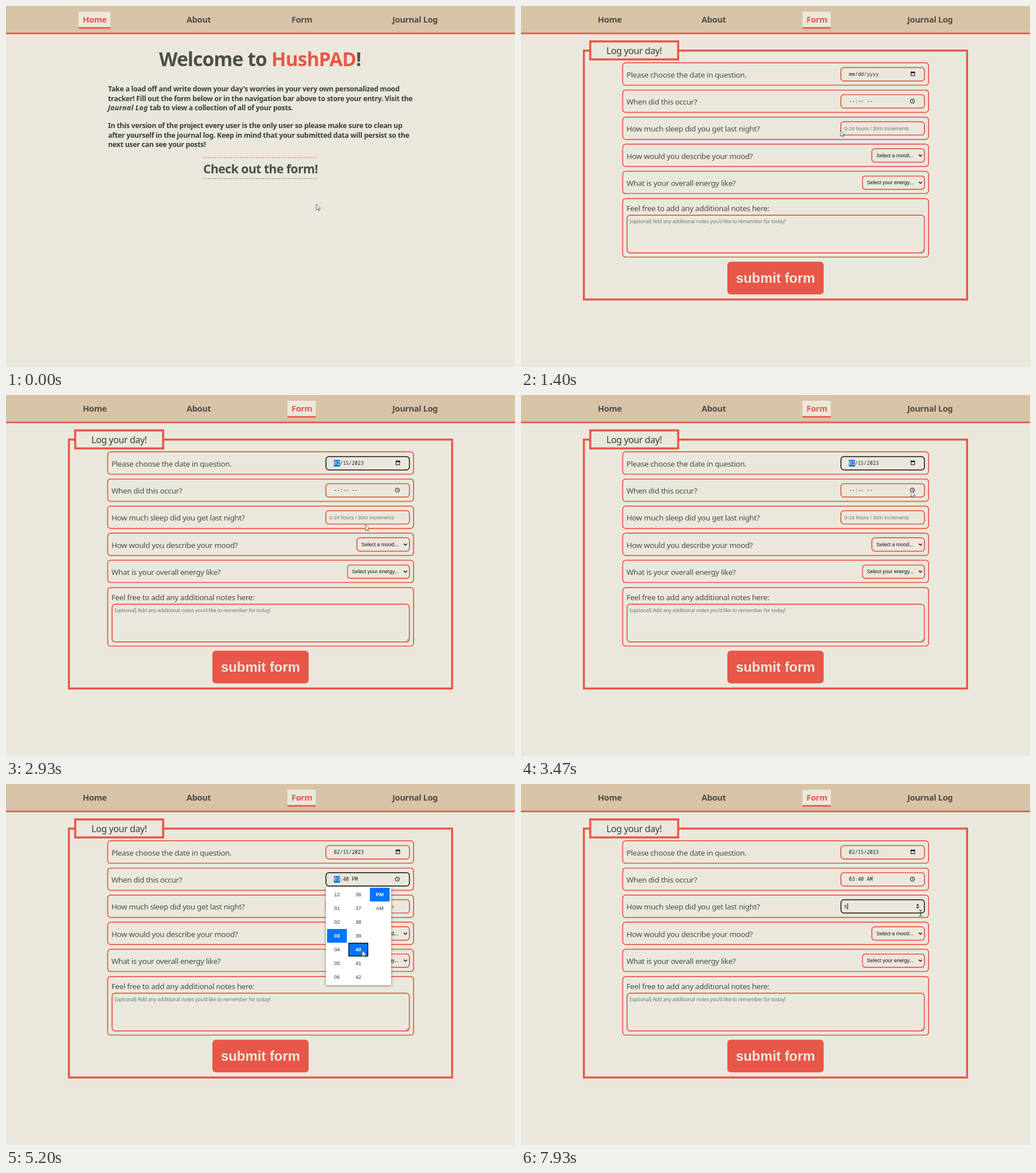
These frames come from a looping animation (888 by 630 pixels, 8 s). An HTML page:

```html
<!DOCTYPE html>
<html lang="en">
<head>
<meta charset="utf-8">
<title>Mood journal</title>
<style>
  html, body { margin: 0; width: 100%; height: 100%; overflow: hidden; background: #eae8dc; }
  svg { display: block; }
  text { font-family: "Noto Sans", sans-serif; letter-spacing: -.025em; }
  .bold { font-weight: 700; }
  .italic { font-style: italic; letter-spacing: .02em; }
  .arial { font-family: "Liberation Sans", Arial, sans-serif; letter-spacing: 0; }
  .mono { font-family: "Noto Sans Mono", monospace; letter-spacing: 0; }
  .mid { text-anchor: middle; }
  .end { text-anchor: end; }
  .soft { filter: drop-shadow(.8px .8px 0 #e8574a); }
  .popup { filter: drop-shadow(0 1px 2px #0007); }
</style>
</head>
<body>
<svg id="stage" width="888" height="630" viewBox="0 0 888 630"></svg>
<script>
const LOOP = 8000;
const BG = '#eae8dc', RED = '#e8574a', INK = '#4c4e49', DARK = '#3b3f3a',
      GREY = '#757575', BLUE = '#0075ff', HOVER = '#cce3ff';

// Moments in ms
const T = {
  page: 870, dateFocus: 1930, calOpen: 2070, dayPick: 2800, calClose: 2930,
  timeFocus: 3530, clockOpen: 3670, hourPick: 4530, minutePick: 5070,
  amPick: 5670, clockClose: 5930, sleepFocus: 6000, count: 7330
};

// Pointer path: time, x, y
const PATH = [
  [0, 541, 345], [250, 541, 345], [780, 472, 283], [1030, 471, 282],
  [1870, 679, 123], [2100, 679, 123], [2790, 626, 226], [2900, 626, 226],
  [3440, 680, 167], [3600, 680, 167], [3735, 649, 206], [4330, 577, 264],
  [4480, 577, 264], [4930, 621, 290], [5220, 621, 290], [5530, 652, 217],
  [5680, 652, 217], [5930, 799, 250], [6200, 718, 218], [6470, 692, 225],
  [6620, 692, 225], [6930, 691, 210], [7800, 691, 210], [7925, 697, 225],
  [LOOP, 697, 225]
];

function pointer(t) {
  const i = PATH.findIndex(k => k[0] > t);
  const [t0, x0, y0] = PATH[i - 1], [t1, x1, y1] = PATH[i];
  const p = (t - t0) / (t1 - t0), e = p * p * (3 - 2 * p);
  return { x: x0 + (x1 - x0) * e, y: y0 + (y1 - y0) * e };
}

const text = (x, y, size, s, cls = '', fill = INK) =>
  `<text x="${x}" y="${y}" font-size="${size}" class="${cls}" fill="${fill}">${s}</text>`;
const rect = (x, y, w, h, fill, more = '') =>
  `<rect x="${x}" y="${y}" width="${w}" height="${h}" fill="${fill}" ${more}/>`;
const line = (d, color, width = 1, more = '') =>
  `<path d="${d}" fill="none" stroke="${color}" stroke-width="${width}" ${more}/>`;
const shape = (d, fill) => `<path d="${d}" fill="${fill}"/>`;

// Rounded red frame; black when focused
const frame = (x, y, w, h, focus) =>
  rect(x + .75, y + .75, w - 1.5, h - 1.5, BG,
    `rx="5" stroke="${focus ? '#111' : RED}" stroke-width="1.5" class="${focus ? '' : 'soft'}"`);

function nav(active) {
  const items = [['Home', 134, 126.6, 55.4], ['About', 315], ['Form', 498, 491, 49.3], ['Journal Log', 674]];
  return rect(0, 0, 888, 47, '#d9c3a7') + rect(0, 46.5, 888, 2.7, RED) +
    items.map(([name, x, left, w]) => {
      const on = name === active;
      return (on ? rect(left, 10, w, 27, BG) + rect(left, 36.8, w, 2.7, RED) : '') +
        text(x, 29, 14.6, name, 'bold', on ? RED : INK);
    }).join('');
}

function home(p) {
  const over = p.y < 301 && p.x > 344 && p.x < 544;
  const lines = [
    [149, "Take a load off and write down your day's worries in your very own personalized mood"],
    [165.7, 'tracker! Fill out the form below or in the navigation bar above to store your entry. Visit the'],
    [182.3, '<tspan class="italic">Journal Log</tspan> tab to view a collection of all of your posts.'],
    [213.2, 'In this version of the project every user is the only user so please make sure to clean up'],
    [229.8, 'after yourself in the journal log. Keep in mind that your submitted data will persist so the'],
    [246.4, 'next user can see your posts!']
  ];
  return nav('Home') +
    text(267, 105, 33.5, `Welcome to <tspan fill="${RED}">HushPAD</tspan>!`, 'bold') +
    lines.map(([y, s]) => text(178, y, 12.42, s, 'bold', DARK)).join('') +
    (over
      ? rect(344, 264, 200, 3.7, RED) + rect(344, 296.3, 200, 3.7, RED)
      : line('M344 264.3h200', RED, .8, 'stroke-dasharray="2.6 1.4"') +
        line('M344 301.3h200', '#6d7570', .8, 'stroke-dasharray="2.6 1.4"')) +
    text(344, over ? 291 : 292, 21.2, 'Check out the form!', 'bold', over ? RED : INK);
}

// Date or time value with its first part selected when focused
const parts = (y, s, focus) =>
  (focus ? rect(572, y - 8.7, 10.6, 11.6, '#0a70d8') : '') +
  text(572, y, 8.7,
    `<tspan fill="${focus ? '#fff' : '#222'}">${s.slice(0, 2)}</tspan>${s.slice(2)}`, 'mono', '#222');

function calendar(t, p) {
  const cx = c => 574.5 + c * 18.6, cy = r => 190 + r * 18.7;
  const picked = t < T.dayPick ? 13 : 15;
  let out = rect(558, 132, 144.5, 186, '#fff', 'class="popup"') +
    text(565, 149, 8, 'February 2023', 'arial bold', '#111') +
    shape('M621.5 145h4.6l-2.3 2.8z', '#111') +
    line('M664.7 153v-10.5m-4.8 4.8l4.8-4.8 4.8 4.8M686 142v10.5m-4.8-4.8l4.8 4.8 4.8-4.8', '#333') +
    ['Su', 'Mo', 'Tu', 'We', 'Th', 'Fr', 'Sa']
      .map((d, c) => text(cx(c), 174, 8.3, d, 'arial mid', '#111')).join('');
  for (let i = 0; i < 42; i++) {
    const x = cx(i % 7), y = cy(i / 7 | 0), n = i - 2;
    const inside = n > 0 && n < 29, on = n === picked;
    const over = Math.abs(p.x - x) < 9.3 && Math.abs(p.y - y) < 9.3;
    if (on) out += rect(x - 8.6, y - 8.6, 17.2, 17.2, BLUE, 'stroke="#111" stroke-width="1.4"');
    else if (over) out += rect(x - 9, y - 9, 18, 18, HOVER);
    out += text(x, y + 3, 8.3, n < 1 ? n + 31 : n > 28 ? n - 28 : n,
      on ? 'arial mid bold' : 'arial mid', on ? '#fff' : inside ? '#111' : GREY);
  }
  return out + text(572, 307, 8.3, 'Clear', 'arial', '#0068d0') +
    text(688, 307, 8.3, 'Today', 'arial end', '#0068d0');
}

const two = n => String(n).padStart(2, '0');
const HOURS = [12, 1, 2, 3, 4, 5, 6].map(two);
const MINUTES = [36, 37, 38, 39, 40, 41, 42].map(two);
const HALVES = ['PM', 'AM'];

const choice = t => [t < T.hourPick ? 0 : 3, t < T.minutePick ? 0 : 4, t < T.amPick ? 0 : 1];

function clock(t, p) {
  const sel = choice(t), focus = t < T.minutePick ? 0 : t < T.amPick ? 1 : 2;
  let out = rect(558, 179.5, 114, 171.5, '#fff', 'class="popup"');
  [HOURS, MINUTES, HALVES].forEach((col, c) => col.forEach((s, r) => {
    const x = 560.2 + c * 37.3, y = 181 + r * 24, on = sel[c] === r;
    const over = p.x >= x && p.x < x + 34.5 && p.y >= y && p.y < y + 24;
    if (on) out += rect(x, y, 34.5, 24, BLUE);
    else if (over) out += rect(x, y, 34.5, 24, HOVER);
    if (on && focus === c) out += rect(x + .7, y + .7, 33.1, 22.6, 'none', 'stroke="#111" stroke-width="1.4"');
    out += text(x + 17.25, y + 15.3, 9, s, on ? 'arial mid bold' : 'arial mid', on ? '#fff' : '#333');
  }));
  return out;
}

function sleepField(t) {
  const focus = t >= T.sleepFocus, counting = t >= T.count;
  const value = counting ? String(Math.min(10, 1 + Math.floor((t - T.count) / 66)) / 2) : '';
  const caret = 564.4 + (value.length > 1 ? 12.4 : value ? 5 : 0);
  const lit = counting || Math.floor((t - T.sleepFocus) / 533) % 2 === 0;
  return frame(557.5, 201.3, 147, 24.7, focus) +
    text(564, 216.6, 8.9, value || '0-24 hours / 30m increments', 'arial', value ? '#333' : GREY) +
    (focus ? shape('M689.4 212.2h5.4l-2.7-3.2zM689.4 214.2h5.4l-2.7 3.2z', '#222') : '') +
    (focus && lit ? rect(caret, 208, 1, 11, '#111') : '');
}

function form(t, p) {
  const dateFocus = t >= T.dateFocus && t < T.timeFocus;
  const timeFocus = t >= T.timeFocus && t < T.sleepFocus;
  const [h, m, a] = choice(t);
  const time = t < T.hourPick ? '--:-- --' : `${HOURS[h]}:${MINUTES[m]} ${HALVES[a]}`;
  const labels = ['Please choose the date in question.', 'When did this occur?',
    'How much sleep did you get last night?', 'How would you describe your mood?',
    'What is your overall energy like?'];
  const select = (x, y, s) => frame(x, y, 704.5 - x, 24.7) +
    text(x + 8.5, y + 15.3, 8.95, s, 'arial', '#111') +
    line(`M694 ${y + 10.8}l2.8 2.8 2.8-2.8`, '#111', 1.4);
  return nav('Form') +
    rect(109.7, 77.8, 668.6, 434.4, 'none', `stroke="${RED}" stroke-width="3.5"`) +
    rect(120.8, 61.8, 153.4, 31.4, BG, `stroke="${RED}" stroke-width="3.6"`) +
    text(149, 84, 16, 'Log your day!', '', DARK) +
    labels.map((s, i) => frame(176.7, 98.6 + i * 47.3, 535, 40.3) +
      text(184, 124.6 + i * 47.3, 13.34, s)).join('') +
    frame(557.5, 106.7, 147, 24.7, dateFocus) +
    parts(122, t < T.calClose ? 'mm/dd/yyyy' : '02/15/2023', dateFocus) +
    rect(680.4, 115.3, 6.4, 6.4, 'none', 'stroke="#111"') +
    rect(680, 115, 7.2, 2.2, '#111') + line('M681.7 114v1.5m3.8-1.5v1.5', '#111') +
    frame(557.5, 154, 147, 24.7, timeFocus) +
    parts(169.3, time, timeFocus) +
    '<circle cx="682.8" cy="166" r="3.7" fill="none" stroke="#111"/>' +
    line('M682.8 163.6v2.6l1.8 1.2', '#111', .9) +
    sleepField(t) +
    select(611.5, 248.6, 'Select a mood...') +
    select(595, 295.9, 'Select your energy...') +
    frame(176.7, 335.4, 535, 103.6) +
    text(184, 357.7, 13.34, 'Feel free to add any additional notes here:') +
    frame(184.5, 364.4, 519.8, 67.2) +
    text(189.5, 379, 8.88, "[optional] Add any additional notes you'd like to remember for today!", '', GREY) +
    line('M697.5 430l5-5m-2 5l2-2', '#555', .8) +
    rect(360, 446.2, 168, 57, RED, 'rx="6"') +
    text(444, 483, 23.9, 'submit form', 'arial bold mid', BG) +
    (t >= T.calOpen && t < T.calClose ? calendar(t, p) : '') +
    (t >= T.clockOpen && t < T.clockClose ? clock(t, p) : '');
}

function cursor(t, { x, y }) {
  const beam = t > 6400 && y > 218;
  return `<g transform="translate(${x} ${y})">` + (beam
    ? line('M-2.5-5q2.5 0 2.5 1.5v7.5q0 1.5-2.5 1.5M2.5-5q-2.5 0-2.5 1.5m0 7.5q0 1.5 2.5 1.5', '#222', .9)
    : '<path d="M.5.5v10.6l2.4-2.3 1.6 3.7 1.6-.7-1.6-3.6h3.3z" fill="#fff" stroke="#444" stroke-width=".8"/>') + '</g>';
}

const stage = document.getElementById('stage');
function draw() {
  const t = performance.now() % LOOP, p = pointer(t);
  stage.innerHTML = (t < T.page ? home(p) : form(t, p)) + cursor(t, p);
  requestAnimationFrame(draw);
}
draw();
</script>
</body>
</html>
```
